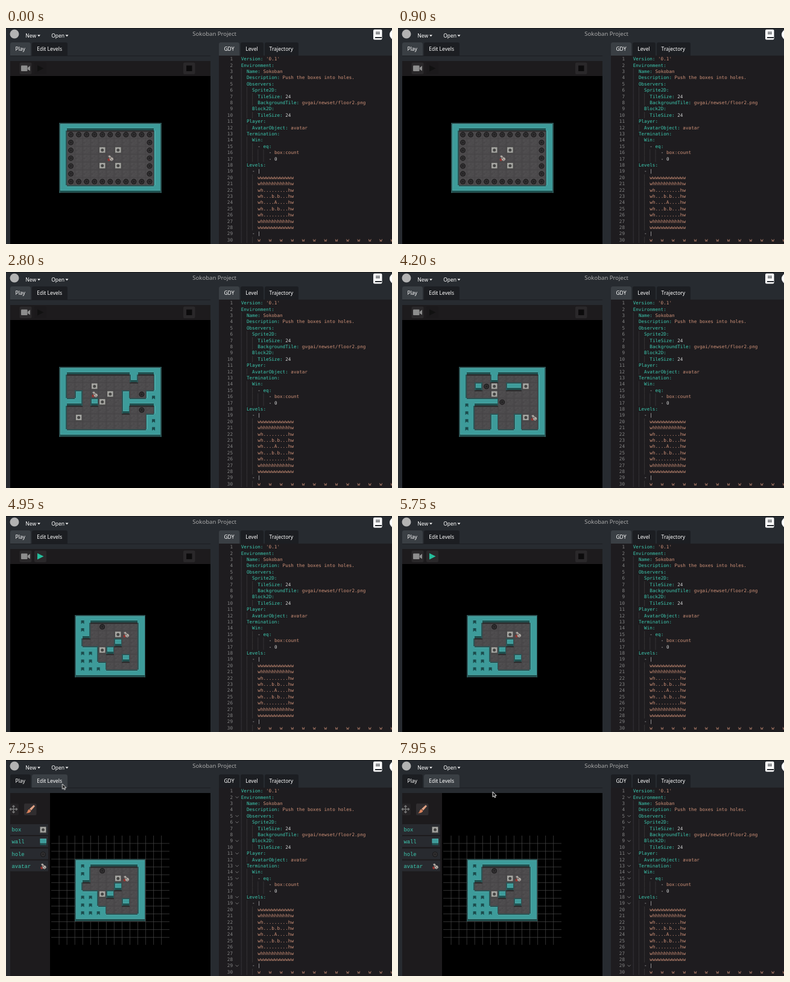
An HTML page for the animation above (8 s loop, 640 by 360 pixels).

```html
<!DOCTYPE html>
<html lang="en">
<head>
<meta charset="utf-8">
<title>Sokoban Project</title>
<style>
html, body { margin: 0; width: 100%; height: 100%; overflow: hidden; background: #272b30; }
svg { display: block; width: 640px; height: 360px; }
text { white-space: pre; }
.ui { font: 8.5px "Noto Sans", sans-serif; fill: #fff; }
.title { font-size: 9.55px; fill: #aaa; }
.code { font: 7.64px "DejaVu Sans Mono", monospace; fill: #d4d4d4; }
.num { fill: #858585; text-anchor: end; }
.key { fill: #3dc9b0; }
.str { fill: #ce9178; }
.tool { font: 8.8px "Liberation Mono", monospace; fill: #3dc9b0; }
.crisp { shape-rendering: crispEdges; }
.show { visibility: hidden; animation: 8s step-end infinite; }
.lv0 { animation-name: lv0; }
.lv1 { animation-name: lv1; }
.lv2 { animation-name: lv2; }
.lv3 { animation-name: lv3; }
.ready { animation-name: ready; }
.gdyTab { animation-name: gdyTab; }
.editTab { animation-name: editTab; }
.playView { animation-name: playView; }
.editView { animation-name: editView; }
.arrow { animation-name: arrow; }
.hand { animation-name: hand; }
.cursor { animation: move 8s linear infinite; }
@keyframes lv0 { 0% { visibility: visible } 32.5%, 100% { visibility: hidden } }
@keyframes lv1 { 0% { visibility: hidden } 32.5% { visibility: visible } 43.75%, 100% { visibility: hidden } }
@keyframes lv2 { 0% { visibility: hidden } 43.75% { visibility: visible } 61.25%, 100% { visibility: hidden } }
@keyframes lv3 { 0% { visibility: hidden } 61.25%, 100% { visibility: visible } }
@keyframes ready { 0% { visibility: hidden } 61.25% { visibility: visible } 88.125%, 100% { visibility: hidden } }
@keyframes gdyTab { 0% { visibility: visible } 85.625%, 100% { visibility: hidden } }
@keyframes editTab { 0% { visibility: hidden } 85.625%, 100% { visibility: visible } }
@keyframes playView { 0% { visibility: visible } 88.125%, 100% { visibility: hidden } }
@keyframes editView { 0% { visibility: hidden } 88.125%, 100% { visibility: visible } }
@keyframes arrow { 0% { visibility: visible } 82% { visibility: hidden } 89.5%, 100% { visibility: visible } }
@keyframes hand { 0% { visibility: hidden } 82% { visibility: visible } 89.5%, 100% { visibility: hidden } }
@keyframes move {
  0%, 14% { transform: translate(430px, 375px) }
  19.5%, 20.5% { transform: translate(347px, 262px) }
  27% { transform: translate(310px, 375px) }
  60% { transform: translate(-20px, 375px) }
  75% { transform: translate(-12px, 306px) }
  80.5% { transform: translate(60px, 75px) }
  82.5%, 88.5% { transform: translate(75px, 36px) }
  98%, 100% { transform: translate(157px, 53px) }
}
</style>
</head>
<body>
<svg id="stage" viewBox="0 0 640 360"></svg>
<script>
const T = 13.05;

const levels = [
  { x: 88, y: 158, rows: `wwwwwwwwwwwww
whhhhhhhhhhhw
wh.........hw
wh...b.b...hw
wh....A....hw
wh...b.b...hw
wh.........hw
whhhhhhhhhhhw
wwwwwwwwwwwww` },
  { x: 88, y: 158, rows: `wwwwwwwwwwwww
w........w..w
w...b.......w
w.w.A.b.w.hww
www.wb..wwwww
w.......w.h.w
w.b........ww
w..........ww
wwwwwwwwwwwww` },
  { x: 101, y: 158, rows: `wwwwwwwwwww
w...w.....w
w.whb.wwb.w
w...b.....w
wwwwwh....w
ww........w
ww..w..wbAw
ww..w..w..w
wwwwwwwwwww` },
  { x: 114, y: 165, rows: `wwwwwwwww
ww.h....w
ww...bA.w
w....w..w
wwwbw...w
www...w.w
wwww....w
wwwwwwwww` }
];

const source = `Version: '0.1'
Environment:
  Name: Sokoban
  Description: Push the boxes into holes.
  Observers:
    Sprite2D:
      TileSize: 24
      BackgroundTile: gvgai/newset/floor2.png
    Block2D:
      TileSize: 24
  Player:
    AvatarObject: avatar
  Termination:
    Win:
      - eq:
          - box:count
          - 0
  Levels:
    - |
${levels[0].rows.replace(/^/gm, '      ')}
    - |
      ${'w   '.repeat(13)}`.split('\n');

const rect = (x, y, w, h, fill, r = 0) =>
  `<rect x="${x}" y="${y}" width="${w}" height="${h}" fill="${fill}" rx="${r}"/>`;
const circle = (x, y, r, fill) => `<circle cx="${x}" cy="${y}" r="${r}" fill="${fill}"/>`;
const path = (d, fill, extra = '') => `<path d="${d}" fill="${fill}" ${extra}/>`;
const text = (x, y, s, cls) => `<text x="${x}" y="${y}" class="${cls}">${s}</text>`;
const group = (cls, body) => `<g class="${cls}">${body}</g>`;
const at = (x, y, body) => `<g transform="translate(${x} ${y})">${body}</g>`;

const sprites = {
  h: circle(6.5, 6.7, 4.5, '#1c1b1c') + circle(6.5, 6.7, 3.1, '#3a383a') + circle(6.5, 6.7, 2.1, '#252425'),
  b: rect(1, 1, 11, 11, '#4a4a49') + rect(1.8, 1.6, 9.4, 9, '#a6a6a2') + circle(6.5, 6.3, 2.5, '#454544'),
  A: path('M2 8.5L4 6.5L5.5 9L6.5 11L3 11.5Z', '#98342f') + path('M3 3L6 2L8 5L11 6L12 9L9 11.5L6 10L5 6Z', '#b0aba5')
    + path('M5 5L8 6L7 8Z', '#5b4a46') + path('M8 8.5L10.5 9L8 10.5Z', '#77706c'),
  w: rect(1.5, 1, 10.5, 11, '#1f5352') + rect(1.5, 1, 10.5, 7.5, '#4da8a6') + rect(2.5, 2, 8.5, 5.5, '#3d9b9a')
};

function board({ x, y, rows }) {
  const map = rows.split('\n');
  const wall = (c, r) => map[r]?.[c] === 'w';
  let floor = '', walls = '', items = '', notches = '';
  map.forEach((row, r) => [...row].forEach((kind, c) => {
    const px = c * T, py = r * T;
    if (kind !== 'w') {
      floor += rect(px, py, T, T, 'url(#floor)');
      if (wall(c, r - 1)) floor += rect(px, py, T, 2, '#2f2e2f');
      if (sprites[kind]) items += at(px, py, sprites[kind]);
      return;
    }
    const up = wall(c, r - 1), down = wall(c, r + 1), left = wall(c - 1, r), right = wall(c + 1, r);
    const rim = '#2c5556', lit = '#4da8a6';
    walls += rect(px, py, T, T, '#3d9b9a');
    if (!up) walls += rect(px, py + 1.5, T, 1.5, lit);
    if (!left) walls += rect(px + 1.5, py, 1.5, T, lit);
    if (!down) walls += rect(px, py + T - 5, T, 1, lit) + rect(px, py + T - 4, T, 3, '#1f5352')
      + rect(px, py + T - 1, T, 1, '#28393a');
    if (!up) walls += rect(px, py, T, 1.5, rim);
    if (!left) walls += rect(px, py, 1.7, T, rim);
    if (!right) walls += rect(px + T - 1.7, py, 1.7, T, rim);
    // a dark notch marks each corner shared by four walls
    if (left && up && wall(c - 1, r - 1))
      notches += path(`M${px - 2.5} ${py - 4}h5v6l-2.5 -2l-2.5 2Z`, '#1b4b4c');
  }));
  return at(x, y, group('crisp', floor + walls) + notches + items);
}

const tabShape = (x, w, fill) => path(`M${x} 46V27q0 -3 3 -3h${w - 6}q3 0 3 3V46Z`, fill);
const tabs = [[7, 34, 'Play', 15.5], [43, 59, 'Edit Levels', 51.2], [353, 34, 'GDY', 361.4],
  [389, 38, 'Level', 397.3], [429, 56, 'Trajectory', 436.6]];

function header() {
  const lit = i => tabShape(tabs[i][0], tabs[i][1], '#3a3f44');
  const caret = x => path(`M${x} 11.5h5l-2.5 2.8Z`, '#fff');
  return rect(0, 0, 640, 1, '#141619') + circle(14, 10, 7.5, '#b3b3b3')
    + text(32.3, 16, 'New', 'ui') + caret(52) + text(75.2, 16, 'Open', 'ui') + caret(98.5)
    + text(309.3, 12.5, 'Sokoban Project', 'ui title')
    + rect(609, 2.5, 14.5, 17, '#fff', 2) + rect(612, 15, 11, 2, '#272b30') + rect(613, 6.5, 7, 1.2, '#272b30')
    + rect(613, 9, 7, 1.2, '#272b30') + circle(645, 11, 9, '#fff')
    + tabs.map(([x, w]) => tabShape(x, w, '#1c1e22')).join('')
    + group('show playView', lit(0)) + group('show gdyTab', lit(2)) + group('show editTab', lit(1))
    + rect(7, 46, 332, 1, '#1c1e22')
    + tabs.map(([, , label, x]) => text(x, 38.3, label, 'ui')).join('');
}

const indent = line => line.search(/\S/);

function editor() {
  let lines = '', folds = '', guides = '';
  source.forEach((line, i) => {
    const y = 54.2 + i * 10.4;
    const [, pad, dash = '', key = '', value] = line.match(/^( *)(- )?(\w+:(?= |$))?(.*)$/);
    const cls = /^ ?(\d+|\|)$/.test(value) ? '' : 'str';
    for (let k = 0; k < pad.length; k += 2) guides += `M${390.2 + k * 4.6} ${y - 7.9}v10.4`;
    lines += text(376, y, i + 1, 'code num') + text(389.7 + pad.length * 4.6, y,
      `${dash}<tspan class="key">${key}</tspan><tspan class="${cls}">${value}</tspan>`, 'code');
    if (source[i + 1] && indent(source[i + 1]) > indent(line))
      folds += path(`M380.5 ${y - 3.8}l2.6 2.6l2.6 -2.6`, 'none', 'stroke="#8a8a8a" stroke-width=".8"');
  });
  return rect(353, 46, 287, 314, '#1e1c1f') + path(guides, 'none', 'stroke="#403e41" stroke-width=".7"')
    + lines + group('show editView', folds);
}

const playTriangle = fill => path('M52 62L62.5 67.2L52 72.5Z', fill);

function playView() {
  return rect(7, 55, 332, 25, '#1d1b1d') + rect(7, 80, 332, 280, '#000')
    + rect(22.5, 57.5, 20, 19.5, '#2a282a', 2) + rect(25, 62.5, 10.5, 9.5, '#8d8d8d', 1)
    + path('M36 66L40 63V71.5L36 69Z', '#8d8d8d')
    + rect(47, 57.5, 20, 19.5, '#1b191b', 2) + playTriangle('#111')
    + rect(294, 57.5, 19.5, 19.5, '#2a282a', 2) + rect(299, 62.5, 9.5, 9.5, '#0c0b0c');
}

const playButton = rect(47, 57.5, 20, 19.5, '#2a282a', 2) + playTriangle('#25bd9b');

function editView() {
  let grid = '';
  for (let i = 1; i < 15; i++) grid += `M${75 + i * T} 126V308`;
  for (let i = 1; i < 14; i++) grid += `M75 ${126 + i * T}H271`;
  const tools = [['box', 'b', 107], ['wall', 'w', 127], ['hole', 'h', 147.5], ['avatar', 'A', 167.5]];
  return rect(7, 55, 66, 305, '#1d1b1d') + rect(73, 55, 266, 305, '#000')
    + path(grid, 'none', 'stroke="#484848" stroke-width=".7"')
    + rect(7, 72.5, 14, 19.5, '#252325', 2)
    + path('M12.5 76V88M6.5 82H18.5M10.5 78L12.5 76L14.5 78M10.5 86L12.5 88L14.5 86M8.5 80L6.5 82L8.5 84M16.5 80L18.5 82L16.5 84',
      'none', 'stroke="#777" stroke-width="1.5"')
    + rect(30, 72.5, 20.5, 19.5, '#302d2f', 2)
    + path('M46 75L48 77L42 84L39 81.5Z', '#e0a184') + path('M38.5 82L41.5 84.8Q40 89 33 88.5Q36 87 36 84.5Q37 82 38.5 82Z', '#d9825c')
    + tools.map(([name, kind, y]) => rect(7, y, 63, 18, '#282a2f', 1) + text(9.5, y + 12, name, 'tool')
      + at(55, y + 3, sprites[kind])).join('');
}

const outline = color => `stroke="${color}" stroke-width=".9" stroke-linejoin="round"`;
const cursor = group('cursor',
  group('show arrow', path('M0 0V8.6L2 6.8L3.3 9.8L4.8 9.1L3.5 6.3H6.2Z', '#111', outline('#fff')))
  + group('show hand', path('M-.9 .5Q0 -.5 .9 .5V3.5L4.5 4.5V8L3.4 10H-1.4L-3.4 6.2L-2.6 5.4L-.9 6.8Z', '#fff', outline('#111'))));

document.getElementById('stage').innerHTML = `<defs>
  <pattern id="floor" width="${T}" height="${T}" patternUnits="userSpaceOnUse">
    ${rect(0, 0, T, T, '#434143')}${rect(0.5, 0.5, 12.2, 12.2, '#4d4b4d')}
    ${path('M2 4L5 2M7 6L10 3M3 10L6 8M8 11L11 8', 'none', 'stroke="#575557" stroke-width=".8"')}
    ${path('M1 7H4M6 4L8 5M9 10H12', 'none', 'stroke="#413f41" stroke-width=".8"')}
  </pattern></defs>`
  + rect(0, 0, 640, 360, '#272b30') + header() + editor()
  + group('show playView', playView()) + group('show ready', playButton) + group('show editView', editView())
  + levels.map((level, i) => group(`show lv${i}`, board(level))).join('') + cursor;
</script>
</body>
</html>
```
